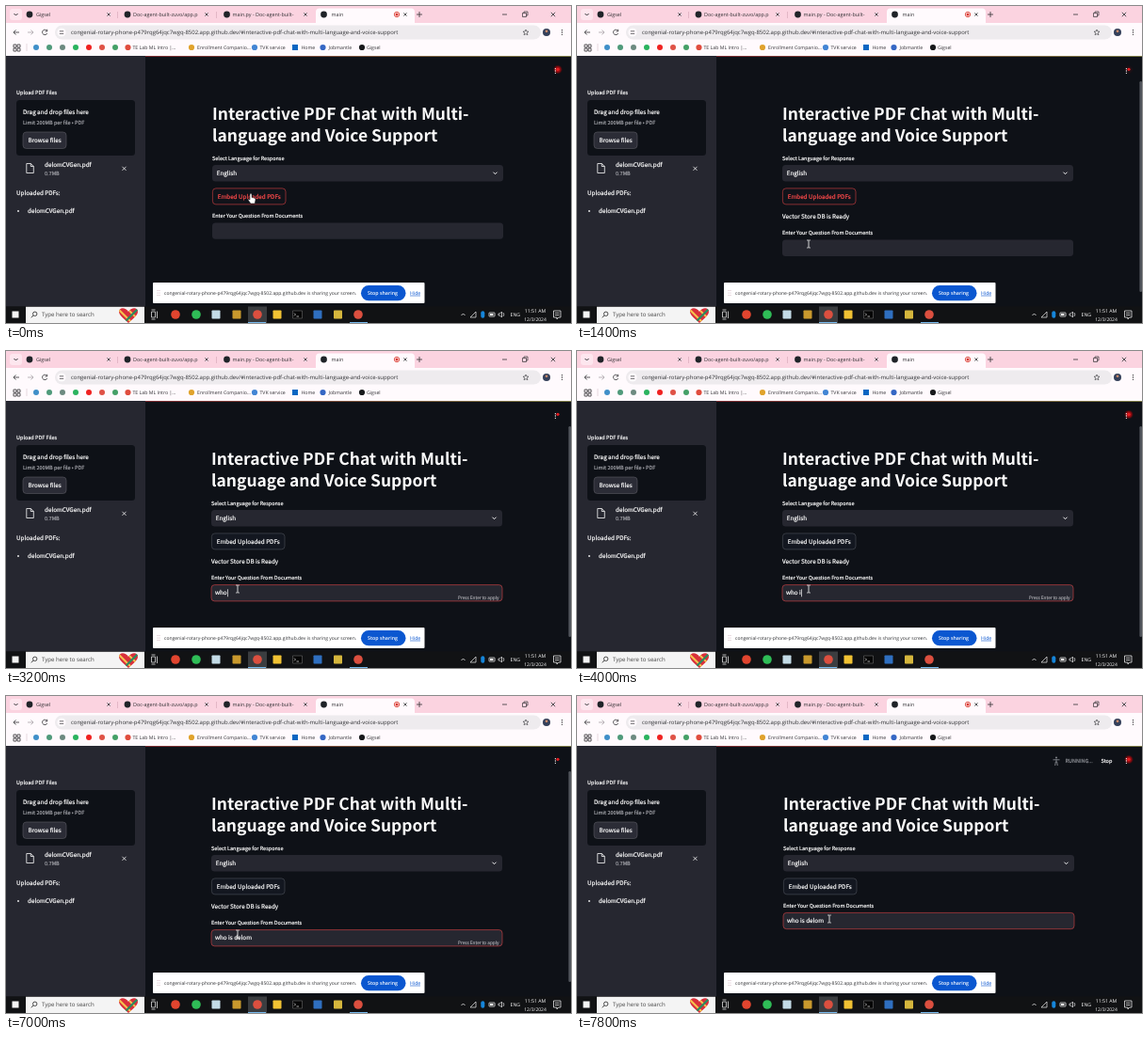
An HTML page with a canvas for the animation above (8000 ms loop, 600 by 337 pixels).

```html
<!DOCTYPE html>
<html lang="en">
<head>
<meta charset="utf-8">
<title>PDF chat</title>
<style>
html, body { margin: 0; width: 100%; height: 100%; overflow: hidden; background: #0e1117; }
canvas { display: block; }
</style>
</head>
<body>
<canvas id="stage" width="600" height="337"></canvas>
<script>
const ctx = document.getElementById('stage').getContext('2d');
const UI = '"Open Sans", "Noto Sans", sans-serif';
const APP = '"Noto Sans CJK JP", "Noto Sans CJK SC", "Noto Sans CJK", "Open Sans", sans-serif';
const WHITE = '#fafafa', GREY = '#a3a4aa', RED = '#ff4b4b', FIELD = '#262730', INK = '#303134';
const BODY = 6.3, SMALL = 5.5;
const LOOP = 8000, STEP = 200;
const PAGE_TOP = 53;
const URL_HOST = 'congenial-rotary-phone-p479rqg64jqc7wgq-8502.app.github.dev';
const PDF = 'delomCVGen.pdf';
const QUESTION = 'who is delom';
// Time at which each letter of the question is typed
const KEYS = [2800, 3000, 3200, 3600, 3800, 4200, 4600, 5000, 5200, 5400, 5600, 6200];
const EMBED = 200, READY = 1000, FOCUS = 1800, SUGGEST = 2000, SUBMIT = 7200;

function text(str, x, y, size, color, family = APP, weight = 400) {
  ctx.font = `${weight} ${size}px ${family}`;
  ctx.fillStyle = color;
  ctx.fillText(str, x, y);
  if (family === APP && weight === 400) {
    // Small page text reads slightly heavier than regular
    ctx.strokeStyle = color;
    ctx.lineWidth = size * 0.035;
    ctx.strokeText(str, x, y);
  }
}
const ui = (str, x, y, size, color = INK, weight = 400) => text(str, x, y, size, color, UI, weight);

function box(x, y, w, h, fill, radius = 0, stroke, width = 0.8) {
  ctx.beginPath();
  ctx.roundRect(x, y, w, h, radius);
  if (fill) { ctx.fillStyle = fill; ctx.fill(); }
  if (stroke) { ctx.strokeStyle = stroke; ctx.lineWidth = width; ctx.stroke(); }
}

function dot(x, y, r, fill) {
  ctx.beginPath();
  ctx.arc(x, y, r, 0, 2 * Math.PI);
  ctx.fillStyle = fill;
  ctx.fill();
}

function line(d, color, width = 0.8, x = 0, y = 0) {
  ctx.save();
  ctx.translate(x, y);
  ctx.strokeStyle = color;
  ctx.lineWidth = width;
  ctx.stroke(new Path2D(d));
  ctx.restore();
}

const cross = (x, y, r, color) => line(`M${-r} ${-r}L${r} ${r}M${r} ${-r}L${-r} ${r}`, color, 0.8, x, y);
const ring = (x, y, r, color) => line(`M${r} 0A${r} ${r} 0 1 1 ${-r} 0A${r} ${r} 0 1 1 ${r} 0`, color, 0.8, x, y);
const chevron = (x, y, color) => line('M-2 -1L0 1L2 -1', color, 1, x, y);
const menuDots = (x, y, color) => [-2.3, 0, 2.3].forEach(d => dot(x, y + d, 0.65, color));

function drawTabs() {
  box(0, 0, 600, 20, '#fbd3e0');
  box(4, 3, 13, 12, '#fde6ee', 3);
  chevron(10.5, 9, INK);
  box(329, 2.5, 105, 18, '#fffafd', [4, 4, 0, 0]);
  [[25, 32, 'Gigsel'], [129, 135, 'Doc-agent-built-zuvo/app.p'],
   [234.5, 240.5, 'main.py - Doc-agent-built-'], [337.5, 345.5, 'main']].forEach(([icon, x, title], i) => {
    dot(icon, 9, 3.4, '#1f2328');
    ui(title, x, 11, 5.4);
    cross([109, 213, 318, 424][i], 9, 1.6, INK);
  });
  line('M223.5 6V13M118.5 6V13', '#d9a9ba', 0.7);
  ring(415, 9, 2.7, '#d93025');
  dot(415, 9, 1.5, '#d93025');
  line('M436 9H442M439 6V12', INK);
  line('M527 9H532', INK);
  line('M548.5 7.5H552.5V11.5H548.5ZM550 7.5V6H554V10H552.5', INK, 0.7);
  cross(581, 9, 2.2, INK);
}

function drawToolbar() {
  box(0, 18, 600, 35, '#fffafd');
  line('M14 28H8M10.5 25.5L8 28L10.5 30.5', INK);
  line('M23 28H29M26.5 25.5L29 28L26.5 30.5', '#a9a3a8');
  line('M43.3 26.2A2.7 2.7 0 1 0 43.7 29M43.7 24.8V27H41.5', INK);
  box(52, 20.5, 516, 15, '#eeebee', 7.5);
  dot(59, 28, 4.6, '#fffafd');
  line('M56.8 26.8H61.2M56.8 29.4H61.2', INK, 0.7);
  ui(URL_HOST + '/#interactive-pdf-chat-with-multi-language-and-voice-support', 69, 30, 5.94);
  line('M0 -3L.9 -.9L3 -.8L1.4 .6L1.9 2.8L0 1.6L-1.9 2.8L-1.4 .6L-3 -.8L-.9 -.9Z', INK, 0.6, 552, 28);
  dot(574, 28, 4, '#35405a');
  dot(574, 26.8, 1.4, '#c98b6c');
  menuDots(590.5, 28, INK);

  for (const x of [8, 12]) for (const y of [41, 45]) box(x, y, 3, 3, null, 0, INK);
  line('M22 40V48', '#dcc9d1', 0.7);
  ['#3f8fc9', '#4f9a7a', '#6d8a80', '#2bb35f', '#f02020', '#df5146', '#45a067']
    .forEach((color, i) => dot(32 + 14 * i, 44, 3, color));
  [[129.5, '#e04c3e', 'TE Lab ML Intro |...', 134.5], [197, '#e0a32c', 'Enrollment Companio...', 203],
   [264, '#4385d4', 'TVK service', 269.5], [307, '#0a66c2', 'Home', 313.5],
   [336.5, '#3567c4', 'Jobmantle', 342.5], [378, '#17191b', 'Gigsel', 383]].forEach(([x, color, label, tx]) => {
    if (label === 'Home') box(x - 3, 41, 6, 6, color);
    else dot(x, 44, 3.1, color);
    ui(label, tx, 46, 5.2);
  });
}

function drawSidebar() {
  box(0, PAGE_TOP, 148, 267, FIELD);
  text('Upload PDF Files', 11, 94.3, SMALL, WHITE);
  box(11, 100, 126, 59, '#0e1117', 3.5);
  text('Drag and drop files here', 18, 114.5, BODY, WHITE);
  text('Limit 200MB per file • PDF', 18, 125.5, SMALL, GREY);
  box(18, 134, 46, 17.5, '#2b2c36', 3.5, '#5b5c64', 0.6);
  text('Browse files', 23.5, 145, BODY, WHITE);
  line('M21.8 167.5H26.3L29.3 170.5V177.5H21.8ZM26.3 167.5V170.5H29.3', WHITE);
  text(PDF, 41, 171.3, BODY, WHITE);
  text('0.7MB', 41, 180.3, SMALL, GREY);
  cross(125.5, 172.8, 2, WHITE);
  text('Uploaded PDFs:', 11, 200.7, BODY, WHITE);
  dot(13, 218, 0.9, WHITE);
  text(PDF, 23, 220.2, BODY, WHITE);
}

function drawQuestion(t, x, labelY) {
  const top = labelY + 5.2;
  const focused = t >= FOCUS;
  text('Enter Your Question From Documents', x, labelY, SMALL, WHITE);
  box(x, top, 309, 17.3, FIELD, 3.5, focused ? RED : null, 0.5);
  const count = KEYS.filter(k => k <= t).length;
  if (!count) return;
  const typed = QUESTION.slice(0, count);
  text(typed, x + 4, top + 10.8, BODY, WHITE);
  if (t >= SUBMIT) return;
  if ((t - KEYS[count - 1]) % 1000 < 500) {
    box(x + 4.3 + ctx.measureText(typed).width, top + 4.6, 0.7, 8, WHITE);
  }
  text('Press Enter to apply', x + 262, top + 15.2, 4.72, GREY);
}

function drawMain(t) {
  const ready = t >= READY && t < SUBMIT;
  const running = (t >= EMBED + STEP && t < READY) || t >= SUBMIT + STEP;
  const x = ready ? 218 : 219;
  box(148, PAGE_TOP, 452, 267, '#0e1117');
  const accent = ctx.createLinearGradient(148, 0, 600, 0);
  accent.addColorStop(0, '#a13339');
  accent.addColorStop(1, '#a1a055');
  box(148, PAGE_TOP, 452, 0.8, accent);

  text('Interactive PDF Chat with Multi-', x, 120.9, 17.45, WHITE, APP, 700);
  text('language and Voice Support', x, 144.1, 17.45, WHITE, APP, 700);
  text('Select Language for Response', x, 163.7, SMALL, WHITE);
  box(x, 169, 309, 17.4, FIELD, 3.5);
  text('English', x + 4.7, 180.2, BODY, WHITE);
  chevron(x + 300.5, 177.7, WHITE);

  const active = t < FOCUS;
  box(x + 0.4, 193.9, 77.6, 17, active ? '#11131a' : '#131720', 3.5, active ? RED : '#5b5e66', 0.5);
  text('Embed Uploaded PDFs', x + 5.7, 204.6, BODY, active ? RED : WHITE);
  if (ready) {
    text('Vector Store DB is Ready', x, 226, BODY, WHITE);
    box(597.4, 80, 2.6, 224, '#50545b', 1.3);
  }
  drawQuestion(t, x, ready ? 243.4 : 225.2);

  if (t >= SUGGEST && t < KEYS[2]) {
    box(262, 269.5, 105, 36, '#1d1919', 2.5);
    ui('what is Socket Orchestration', 267, 281.9, 5.2, WHITE, 600);
    ui('what is the meaning of this', 267, 297.2, 5.2, WHITE, 600);
  }
  if (running) {
    dot(509, 65.5, 1.1, '#777a80');
    line('M505.5 67.8H512.5M509 67V71M507.7 74L508.3 70H509.7L510.3 74', '#777a80', 1);
    text('RUNNING...', 518.5, 71.2, SMALL, '#8e9096');
    text('Stop', 556.5, 71.2, SMALL, WHITE);
  }
  drawPulse(t);
}

function drawPulse(t) {
  const glow = Math.pow((1 + Math.cos((t + 100) * Math.PI / 1000)) / 2, 3);
  const halo = ctx.createRadialGradient(586, 67.5, 0.5, 586, 67.5, 5);
  halo.addColorStop(0, `rgba(240,20,20,${glow})`);
  halo.addColorStop(0.55, `rgba(165,10,15,${glow * 0.8})`);
  halo.addColorStop(1, 'rgba(120,0,0,0)');
  dot(586, 67.5, 5, halo);
  dot(586, 67.3, 1.6, '#e51d22');
  menuDots(583.4, 69, WHITE);
}

function drawSharingBar() {
  box(156, 294, 288.5, 22, '#fff', 1);
  for (const x of [161, 163]) for (const y of [302.5, 305, 307.5]) dot(x, y, 0.5, '#c9a5b2');
  ui(URL_HOST + ' is sharing your screen.', 168, 306.8, 5.03);
  box(377, 297, 47.5, 16.3, '#0b57d0', 8.2);
  ui('Stop sharing', 384, 306.9, 5.3, '#fff', 600);
  ui('Hide', 429, 306.8, 5.2, '#0b57d0');
  line('M429 308H440', '#0b57d0', 0.6);
}

function drawTaskbar() {
  box(0, 319.3, 600, 17.7, '#111214');
  box(6.5, 324.5, 7, 7, '#f4f4f4');
  box(21, 319.8, 126, 17.2, '#f4f4f4');
  ring(30.7, 327.3, 2.2, '#222');
  line('M29 329L26.8 331.3', '#222');
  ui('Type here to search', 38, 330.4, 6.1, '#444');

  ctx.save();
  ctx.translate(130, 328);
  ctx.clip(new Path2D('M0 9C-4 5-10 1-10-3C-10-8-3-8 0-3C3-8 10-8 10-3C10 1 4 5 0 9Z'));
  box(-10, -9, 20, 18, '#d92f3a');
  line('M-10 -5L3 8M-4 -9L8 3', '#f4c44e', 2);
  line('M10 -6L-4 8', '#2b8b60', 2.2);
  ctx.restore();

  line('M154.5 325H158.5V331H154.5ZM160.5 324.5V332M154.5 323H158.5M154.5 333H158.5', '#ddd');
  box(257, 319.5, 20, 17.5, '#3b3d40');
  const round = (x, color) => dot(x, 328, 4.8, color);
  const square = (x, color) => box(x - 4.5, 323.5, 9, 9, color, 0.8);
  round(180, '#e1452f');
  round(202, '#2fbd57');
  square(223, '#c3dbe6');
  square(245, '#c9992d');
  round(267, '#db4f3f');
  square(288, '#f1c233');
  box(304.5, 324, 10, 8, '#050505', 0, '#6a6a6a', 0.6);
  line('M306 326.5L307.5 328L306 329.5M308.5 330H311', '#eee', 0.7);
  square(331, '#2f6fc0');
  square(352.5, '#d5b63d');
  round(374, '#db4f3f');
  for (const x of [257, 365]) box(x, 336, 19, 1, '#76b9ed');

  line('M483.5 329L485.5 327L487.5 329', '#eee');
  line('M493 331L499 325V331Z', '#eee', 0.7);
  box(504.3, 324.3, 4, 7.4, '#1685d9', 2);
  box(513, 326, 6, 4, null, 0.5, '#eee');
  box(514, 327, 3.5, 2, '#eee');
  line('M523 327H524.5L526.5 325V331L524.5 329H523ZM528 326A3 3 0 0 1 528 330', '#eee', 0.7);
  ui('ENG', 535.5, 330, 5.2, '#fff');
  ctx.textAlign = 'center';
  ui('11:51 AM', 562, 326.2, 5.2, '#fff');
  ui('12/3/2024', 562, 334.6, 5, '#fff');
  ctx.textAlign = 'left';
  line('M581.5 324H589V331H586.5L585 333V331H581.5ZM583 326.3H587.5M583 328.5H587.5', '#fff', 0.7);
}

function drawPointer(t) {
  const slide = (from, to) => Math.min(1, Math.max(0, (t - from) / (to - from)));
  const ease = p => p * p * (3 - 2 * p);
  const a = ease(slide(400, 1200)), b = ease(slide(SUBMIT, 7800));
  const x = 261 - 15 * a + 22 * b, y = 205 + 48 * a - 16 * b;
  if (t < 800) {
    ctx.save();
    ctx.translate(x, y);
    const hand = new Path2D('M-2 0V-5Q-1 -6.3 0 -5V-1.5L3 -.8Q4.2 -.4 4 1L3.2 5H-1.2L-4 1Q-3.5 -.5 -2 1Z');
    ctx.fillStyle = '#fff';
    ctx.fill(hand);
    ctx.strokeStyle = '#111';
    ctx.lineWidth = 0.5;
    ctx.stroke(hand);
    ctx.restore();
  } else {
    line('M-1.8 -4H-.4L0 -3.6L.4 -4H1.8M0 -3.6V3.6M-1.8 4H-.4L0 3.6L.4 4H1.8', '#e8e8e8', 0.9, x, y);
  }
}

function render(now) {
  const t = Math.floor((now % LOOP) / STEP) * STEP;
  ctx.textRendering = 'geometricPrecision';
  ctx.lineJoin = 'round';
  drawTabs();
  drawToolbar();
  drawMain(t);
  drawSidebar();
  drawSharingBar();
  drawTaskbar();
  drawPointer(t);
}

const start = performance.now();
function tick() {
  render(performance.now() - start);
  requestAnimationFrame(tick);
}
tick();
</script>
</body>
</html>
```
